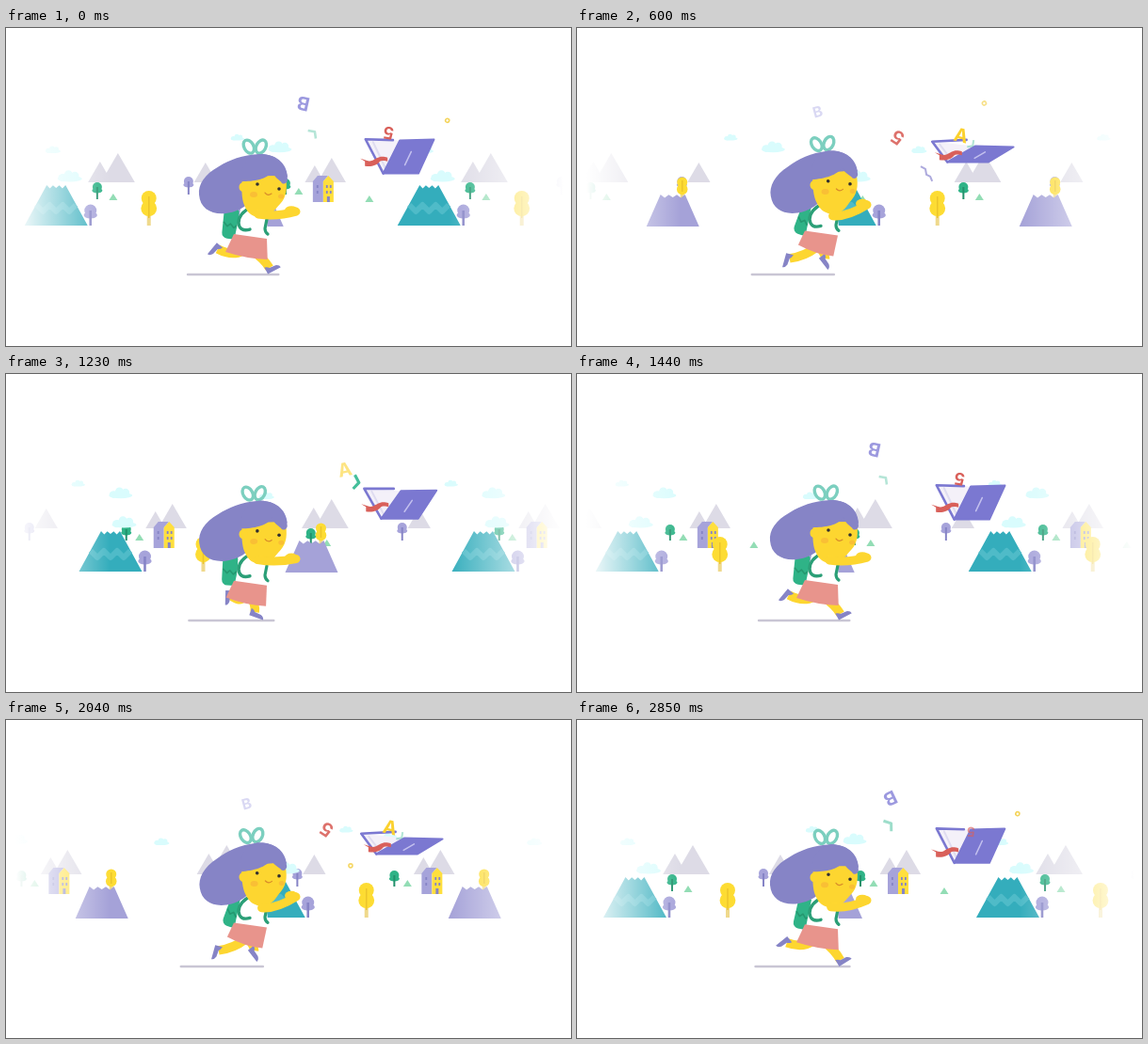
An HTML page with a canvas that plays this animation: 600x338 px, repeating every 2.88 s.

```html
<!DOCTYPE html>
<html lang="en">
<head>
<meta charset="utf-8">
<title>Running after a flying book</title>
<style>
html, body { margin: 0; width: 100%; height: 100%; overflow: hidden; background: #fff; }
canvas { display: block; width: 600px; height: 338px; }
</style>
</head>
<body>
<canvas id="stage" width="600" height="338"></canvas>
<script>
const c = document.getElementById('stage').getContext('2d');
const LOOP = 2880, STEP = 240, TILE = 396;
const PURPLE = '#8684c6', LILAC = '#a6a3da', YELLOW = '#fdd630', GREEN = '#2fb387',
  RED = '#d9605a', COVER = '#7b78d1', GREY = '#dddbe6', MINT = '#7ccfbf';
const { sin, cos, min, max, PI } = Math;

const mod = (a, n) => ((a % n) + n) % n;
const mix = (a, b, k) => a + (b - a) * k;
// One swing per step, highest at the given time.
const swing = (t, peak) => cos(2 * PI * (t - peak) / STEP);
const lift = t => 2.5 * swing(t, 30) - 1.75;
const spread = t => swing(t, -15);

function trace(p) {
  c.beginPath();
  for (let i = 0; i < p.length; i += 2) c.lineTo(p[i], p[i + 1]);
}
function pen(color, width) { c.strokeStyle = color; c.lineWidth = width; }
function poly(color, ...p) { trace(p); c.fillStyle = color; c.fill(); }
function line(color, width, ...p) { trace(p); pen(color, width); c.stroke(); }
function oval(color, x, y, rx, ry = rx) {
  c.beginPath(); c.ellipse(x, y, rx, ry, 0, 0, 7);
  c.fillStyle = color; c.fill();
}
function shape(color, d) { c.fillStyle = color; c.fill(new Path2D(d)); }
function stroke(color, width, d) { pen(color, width); c.stroke(new Path2D(d)); }
function at(x, y, draw, turn = 0, size = 1) {
  c.save(); c.translate(x, y); c.rotate(turn * PI / 180); c.scale(size, size);
  draw(); c.restore();
}

// Scenery
function peak(x, y) {
  const half = (164 - y) * .58;
  poly(GREY, x - half, 164, x, y, x + half, 164);
}
function cloud(x, y, w) {
  const white = '#d9fcfd';
  oval(white, x - w * .28, y + w * .08, w * .18, w * .15);
  oval(white, x - w * .05, y - w * .04, w * .17);
  oval(white, x + w * .2, y, w * .16);
  oval(white, x, y + w * .12, w * .48, w * .12);
}
function tree(x, y, r, color, trunk, foot) {
  oval(color, x, y, r);
  oval(color, x, y + r * .75, r * 1.1, r * .55);
  line(trunk, r * .4, x, y, x, foot);
}
function poplar(x, y, r, foot) {
  line('#efd98c', 4, x, y, x, foot);
  oval('#fddc33', x, y, r);
  oval('#fddc33', x, y + r * 1.35, r * 1.05);
  line('#ecc52c', 1.5, x, y - 2, x, foot - 8);
}
function fir(x, base) { poly('#93ddb5', x - 4.5, base, x, base - 7, x + 4.5, base); }
function house(x) {
  poly(LILAC, x - 11, 185, x - 11, 163, x - 6, 157, x + 5, 157, x, 163, x, 185);
  poly('#ffdf3d', x, 185, x, 163, x + 5.5, 157, x + 11, 163, x + 11, 185);
  c.fillStyle = PURPLE;
  for (const y of [167, 173]) for (const dx of [-7, 3, 7]) c.fillRect(x + dx, y, 1.8, 3);
  c.fillRect(x + 4, 179, 3, 6);
}
function mountain(color, x, base, half, top, ridge) {
  const p = [x - half, base];
  for (let i = -3; i <= 3; i++) p.push(x + i * ridge / 3, top + (i % 2 ? 0 : 3) + Math.abs(i) % 3 * .3);
  poly(color, ...p, x + half, base);
}
function stripe(x) {
  const p = [];
  for (let i = -3; i <= 3; i++) p.push(x + i * 7, i % 2 ? 188 : 195);
  line('#4fbbc8', 6, ...p);
}
function farTile() {
  peak(100, 142); peak(119, 133); peak(212, 143); peak(328, 146); peak(346, 138);
  cloud(50, 129, 17); cloud(246, 116, 15); cloud(291, 126, 26);
  house(337);
  tree(97, 169, 5, GREEN, '#23916c', 182);
  tree(297, 165, 5, GREEN, '#23916c', 177);
  tree(194, 163, 5, LILAC, PURPLE, 177);
  fir(114, 183); fir(311, 177); fir(386, 185);
}
function nearTile() {
  poplar(277, 164, 5.5, 182);
  mountain('#a5a2d8', 267, 211, 28, 177, 13);
  tree(90, 194, 6.5, LILAC, PURPLE, 210);
  mountain('#34adbc', 53.5, 210, 33.5, 167, 10);
  stripe(53.5);
  poplar(152, 181, 8, 210);
  cloud(68, 157, 27);
}
function repeat(tile, shift) {
  for (let x = -mod(shift, TILE) - TILE; x < 1000; x += TILE) at(x, 0, tile);
}
function fade(from, to) {
  const g = c.createLinearGradient(from, 0, to, 0);
  g.addColorStop(0, 'rgba(255,255,255,0)');
  g.addColorStop(1, '#fff');
  c.fillStyle = g;
  c.fillRect(to < from ? 0 : from, 40, to < from ? from : 600 - from, 190);
}

// Each leg takes two steps per turn; the foot follows a few harmonics.
function leg(t) {
  const a = PI * t / STEP;
  const x = 248.5 + 27 * cos(a + .78) + 3.8 * cos(2 * a) + 8.5 * cos(3 * a);
  const y = 245 + 10 * cos(a) - 1.5 * sin(2 * a);
  const pitch = 65 - 69 * cos(a + .57) - 14 * cos(2 * a) - 24 * cos(3 * a + .46);
  const hipX = 256 + 6 * cos(a + .4), hipY = 237 + lift(t);
  const kneeX = (hipX + x) / 2 + 3, kneeY = (hipY + y) / 2 + 3 - 4 * cos(a);
  c.lineCap = 'butt';
  stroke(YELLOW, 9.5, `M${hipX} ${hipY}Q${kneeX} ${kneeY} ${x} ${y}`);
  at(x, y, () => shape(PURPLE, 'M-4.5 -3Q-1 -2 0 0L7 .5Q11 2 11 5H-4.5Z'), pitch);
  c.lineCap = 'round';
}
function backpack() {
  c.beginPath(); c.roundRect(-8, -17, 16, 34, 6);
  c.fillStyle = GREEN; c.fill();
  line('#259870', 1.6, -7, 0, -3, 4, 0, 1, 4, 5, 7, 2);
}
function bow() {
  pen(MINT, 3.4);
  for (const side of [-1, 1]) {
    c.beginPath();
    c.ellipse(264.5 + side * 6.5, 126, 5, 7.5, side * .5, 0, 7);
    c.stroke();
  }
}
function head() {
  bow();
  shape(PURPLE, 'M299 158C298 143 286 134 270 134C250 135 238 140 226 147C211 155 204 166 205 177C206 191 217 198 232 197C244 196 252 191 258 186L290 168Z');
  shape(YELLOW, 'M251 157H297C299 170 298 180 291 187C284 194 280 203 267 201C259 199 256 195 253 188C250 181 250 170 251 157Z');
  oval(YELLOW, 252, 169, 4.5, 5);
  shape(PURPLE, 'M250 163C263 163 278 161 283 152C285 160 291 161 293 165Q297 167 299 162C299 144 286 134 270 134C256 136 248 148 250 163Z');
  oval('#f9bf35', 263, 177, 4, 3);
  oval('#f9bf35', 292, 179, 3, 2.5);
  oval('#33302f', 267, 166, 1.8);
  oval('#33302f', 290, 171, 1.8);
  stroke('#d98d2b', 1.2, 'M275 175Q278 179 282 176');
}
function girl(t) {
  const up = lift(t), s = spread(t);
  line('#c9c6d4', 2.6, 193 + 2 * up, 262, 281 + 9 * s, 262);
  leg(t + STEP);
  leg(t);
  at(238.5 - up, 207 + up, backpack, 6 - 4 * up);
  at(0, up, () => {
    poly('#fff', 250, 188, 276, 194, 279, 227, 243, 222);
    stroke('#2b9f77', 3.4, 'M261 190Q247 197 247 207Q248 217 259 214');
    stroke('#2b9f77', 3.2, 'M277 203L275 213Q275 217 278 219');
    shape('#e8948c', `M242 219L277 224L${275 + 3 * s} 246Q255 245 ${234 - s} ${236 + 2 * s}Z`);
  });
  at(270, 170 + up, () => { c.translate(-270, -170); head(); }, 2.5 * s - 2.5);
  const handY = 195 + 2 * up;
  stroke(YELLOW, 9, `M${268 - up} ${198 - up / 2}Q287 201 308 ${handY}`);
  oval(YELLOW, 303, handY - 1, 7, 5);
}

// Corners: left, spine top, spine bottom, right bottom, right top.
const OPEN = [382, 118, 418, 119, 401, 155, 438, 155, 454, 118];
const FLAT = [377, 121, 423, 126, 393, 142, 437, 142, 464, 127];
function book(t) {
  const k = (1 + spread(t)) / 2, drop = 4 * swing(t, 60);
  const [ax, ay, bx, by, dx, dy, ex, ey, fx, fy] = FLAT.map((v, i) => mix(v, OPEN[i], k) + i % 2 * drop);
  poly('#f4f1f9', ax, ay, bx, by, dx, dy);
  line('#dfdcf0', 2, ax + 8, ay + 3, dx + 3, dy - 4);
  line(COVER, 2.6, mix(ax, bx, .8), mix(by - 7, by, k), ax, ay, dx, dy);
  line(COVER, 2, dx, dy, ex, ey, fx, fy, bx, by, dx, dy);
  poly(COVER, dx, dy, ex, ey, fx, fy, bx, by);
  const mx = (dx + ex) / 2, my = (dy + ey) / 2, nx = (bx + fx) / 2, ny = (by + fy) / 2;
  line('#c3c0ee', 1.5, mix(mx, nx, .25), mix(my, ny, .25), mix(mx, nx, .65), mix(my, ny, .65));
  at(mix(407, 403, k), mix(133, 140, k) + drop / 2, () =>
    shape(RED, 'M2 -2C-6 -5 -10 -1 -14 1C-19 3 -22 0 -27 -1L-22 2L-22 7C-14 8 -10 6 -7 3C-4 0 0 2 2 2Z'));
}

// Things that fly out of the book along a bend.
const letter = (text, color) => () => {
  c.fillStyle = color;
  c.font = 'bold 20px Inter, Roboto, sans-serif';
  c.textAlign = 'center';
  c.textBaseline = 'middle';
  c.fillText(text, 0, 1);
};
const five = letter('5', RED), bee = letter('B', '#9c99df'), ay = letter('A', '#fbd12e');
const corner = () => stroke('#45bf9b', 3.2, 'M-5 -5L4 -3L5 6');
const zigzag = () => stroke(LILAC, 2, 'M-6 -8L-1 -5L0 1L4 3L6 8');
const ring = () => stroke('#f4d45c', 1.6, 'M2 0A2 2 0 1 1 -2 0A2 2 0 1 1 2 0');
const BITS = [
  { draw: five, every: 480, start: 435, life: 300, bend: [372, 70], end: [235, 186], turn: 180, spin: 60 },
  { draw: bee, every: 480, start: 790, life: 360, bend: [296, 43], end: [227, 109], turn: -24, spin: 456 },
  { draw: ay, every: 480, start: 505, life: 350, bend: [405, 105], end: [310, 95], turn: 30, spin: -60 },
  { draw: corner, every: 480, start: 585, life: 470, bend: [336, 105], end: [313, 116], turn: 90, spin: -115 },
  { draw: ring, every: LOOP, start: 2400, life: 1700, bend: [561, 70], end: [288, 77], turn: 0, spin: 90 },
  { draw: zigzag, every: LOOP, start: 300, life: 560, bend: [378, 170], end: [320, 152], turn: -60, spin: 110 },
  { draw: zigzag, every: LOOP, start: 2220, life: 450, bend: [364, 60], end: [300, 85], turn: -60, spin: 110 },
  { draw: ring, every: LOOP, start: 1860, life: 340, bend: [378, 170], end: [300, 152], turn: 0, spin: 0 }
];
function bits(t) {
  for (const b of BITS) {
    const p = mod(t - b.start, b.every) / b.life, q = 1 - p;
    if (p > 1) continue;
    const [x, y] = [424, 124].map((v, i) => q * q * v + 2 * p * q * b.bend[i] + p * p * b.end[i]);
    c.globalAlpha = min(1, 12 * p, 2 * q);
    at(x, y, b.draw, b.turn + b.spin * p, min(1, .6 + 2 * p, .4 + 2 * q));
  }
  c.globalAlpha = 1;
}

function draw(t) {
  c.fillStyle = '#fff';
  c.fillRect(0, 0, 600, 338);
  c.lineCap = 'butt';
  c.lineJoin = 'round';
  repeat(farTile, t * TILE / LOOP);
  repeat(nearTile, t * TILE * 2 / LOOP);
  fade(110, 10);
  fade(470, 592);
  c.lineCap = 'round';
  girl(t);
  book(t);
  c.lineCap = 'butt';
  bits(t);
}

const begin = performance.now();
function frame() {
  draw(mod(performance.now() - begin, LOOP));
  requestAnimationFrame(frame);
}
frame();
</script>
</body>
</html>
```
